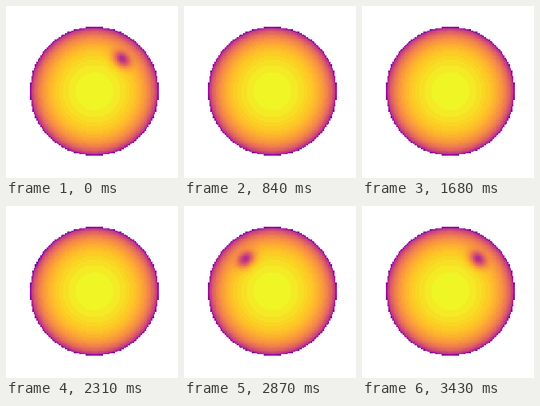
A matplotlib script for the animation above (3.5 s loop, 216 by 216 pixels).

```python
import numpy as np
import matplotlib.pyplot as plt
from matplotlib.animation import FuncAnimation
from matplotlib.colors import ListedColormap

SIZE = 216
FRAMES = 50
INTERVAL = 70
RES = 100
LEVELS = 44
U1, U2 = 0.40, 0.26          # quadratic limb darkening
SPOT_LAT, SPOT_LON = np.radians(30), np.radians(30)
SPOT_WIDTH = 0.10            # radians
SPOT_DEPTH = 0.41
DARKEST = (1 - U1 - U2) * (1 - SPOT_DEPTH)   # spot centre seen on the limb

# Cell centres of the visible hemisphere, z towards the viewer.
axis = (np.arange(RES) + 0.5) * 2 / RES - 1
x, y = np.meshgrid(axis, axis)
r2 = x**2 + y**2
mu = np.sqrt(np.clip(1 - r2, 0, None))
limb = 1 - U1 * (1 - mu) - U2 * (1 - mu)**2

# Colour bands, each showing the colour of its middle.
bands = ListedColormap(plt.get_cmap("plasma")((np.arange(LEVELS) + 0.5) / LEVELS))


def star(frame):
    """Surface brightness of the rotating, spotted star."""
    lon = SPOT_LON + 2 * np.pi * frame / (FRAMES - 1)
    cos_angle = (x * np.cos(SPOT_LAT) * np.sin(lon)
                 + y * np.sin(SPOT_LAT)
                 + mu * np.cos(SPOT_LAT) * np.cos(lon))
    spot = SPOT_DEPTH * np.exp((cos_angle - 1) / SPOT_WIDTH**2)
    return np.ma.masked_where(r2 > 1, limb * (1 - spot))


fig = plt.figure(figsize=(3, 3), dpi=SIZE / 3, facecolor="white")
ax = fig.add_axes([30 / SIZE, 28 / SIZE, 162 / SIZE, 162 / SIZE])
ax.axis("off")
image = ax.imshow(star(0), origin="lower", extent=(-1, 1, -1, 1),
                  interpolation="nearest", vmin=DARKEST, vmax=1, cmap=bands)


def update(frame):
    image.set_data(star(frame))
    return [image]


anim = FuncAnimation(fig, update, frames=FRAMES, interval=INTERVAL,
                     repeat=True, repeat_delay=0)
plt.show()
```
